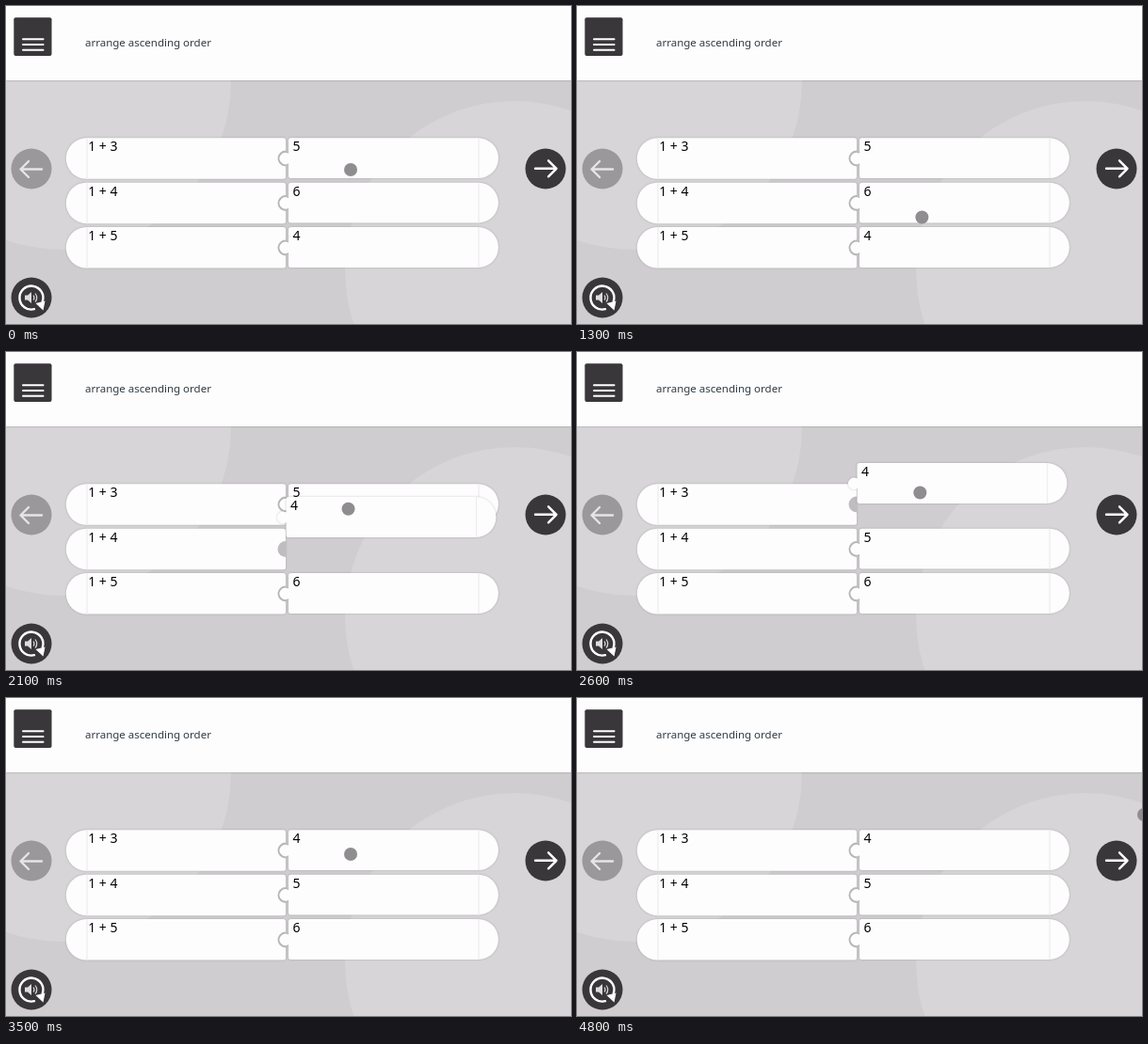
An HTML page that plays this animation: 600x338 px, repeating every 5 s.

```html
<!DOCTYPE html>
<html lang="en">
<head>
<meta charset="utf-8">
<title>Arrange ascending order</title>
<style>
  html, body { margin: 0; width: 100%; height: 100%; overflow: hidden; }
  svg { display: block; width: 600px; height: 338px; background: #cfcdcf; }
  text { font: 14px "Noto Sans", sans-serif; fill: #000; }
  .title { font-size: 11.5px; fill: #2f3b42; }
  .card { fill: #fefdfe; filter: drop-shadow(0 .8px 1px rgba(0, 0, 0, .2)); }
  .header { fill: #fefdfe; filter: drop-shadow(0 .8px 1.2px rgba(0, 0, 0, .3)); }
  .notch { fill: #bfbdbf; }
  .fold { stroke: #f0eef0; stroke-width: 1.5; }
  .dark { fill: #393739; }
  .line { fill: none; stroke: #fff; stroke-width: 2; stroke-linecap: round; stroke-linejoin: round; }
  .bold { stroke-width: 2.4; }
</style>
</head>
<body>
<svg viewBox="0 0 600 338">
  <defs>
    <g id="left">
      <path class="card" d="M85.5 0H294.5Q297 0 297 2.5V41Q297 43.5 294.5 43.5H85.5A21.75 21.75 0 0 1 85.5 0Z"/>
      <path class="notch" d="M297 13.3A8.5 8.5 0 1 0 297 30.3Z"/>
      <path class="fold" d="M86 0V43.5"/>
    </g>
    <g id="right">
      <path class="card" d="M302.5 0H501.5A21.4 21.4 0 0 1 501.5 42.8H302.5Q300 42.8 300 40.3V27A6.2 6.2 0 1 1 300 16.5V2.5Q300 0 302.5 0Z"/>
      <path class="fold" d="M502 0V42.8"/>
    </g>
    <path id="arrow" class="line bold" d="M-11 0H11.5M3 -8.5L11.5 0L3 8.5"/>
  </defs>

  <g fill="#d7d5d7">
    <circle cx="60" cy="80" r="179"/>
    <circle cx="540" cy="281" r="180"/>
  </g>
  <rect class="header" width="600" height="79"/>
  <text class="title" x="84" y="43">arrange ascending order</text>

  <rect class="dark" x="8.3" y="12.2" width="40.2" height="40.8" rx="2"/>
  <path class="line" d="M18 35.2h21.5m-21.5 5.8h21.5m-21.5 5.8h21.5"/>

  <circle cx="27" cy="173" r="21.5" fill="#9a989a"/>
  <use href="#arrow" transform="translate(27 173.5) scale(-1 1)" opacity=".75"/>
  <circle class="dark" cx="573" cy="173" r="21.5"/>
  <use href="#arrow" transform="translate(573 172.8)"/>

  <g transform="translate(27 310)">
    <circle class="dark" r="21.5"/>
    <path class="line bold" d="M3 12.2A12.5 12.5 0 1 1 11.8 4"/>
    <path d="M4.5 6L14.5 3.5L12.5 13.5Z" fill="#fff"/>
    <path d="M-7 -2.5H-4L0 -6V6L-4 2.5H-7Z" fill="#ddd"/>
    <path d="M2 -2.5Q4 0 2 2.5M4 -4.5Q7.5 0 4 4.5" fill="none" stroke="#ddd" stroke-width="1.2"/>
  </g>

  <g id="cards"></g>
  <circle id="pointer" r="7" fill="#8f8d8f"/>
</svg>
<script>
const LOOP = 5000, STEP = 100;
const rowTop = row => 140.3 + 47.4 * row;
const easeOut = k => 1 - (1 - k) ** 1.3;

// Pointer stops: time, x, y
const stops = [
  [0, 366, 174], [600, 367, 155], [700, 367, 163], [1000, 367, 163],
  [1550, 366, 259], [1600, 366, 259], [2000, 363.5, 178], [2400, 363.5, 142],
  [2500, 363.5, 142], [2900, 366, 166], [3700, 366, 166], [4200, 602, 124]
];

// A held card trails the pointer by one step
const drags = [{ value: 5, from: 700, to: 900 }, { value: 4, from: 1700, to: 3500 }];

const layer = document.getElementById("cards");
const pointer = document.getElementById("pointer");

function addCard(shape, label, x) {
  const g = document.createElementNS("http://www.w3.org/2000/svg", "g");
  g.innerHTML = `<use href="#${shape}"/><text x="${x}" y="13.9">${label}</text>`;
  return layer.appendChild(g);
}

const place = (el, x, y) => el.setAttribute("transform", `translate(${x} ${y})`);

const cards = {};
for (let row = 0; row < 3; row++) {
  place(addCard("left", `1 + ${row + 3}`, 87.2), 0, rowTop(row));
}
for (const value of [4, 5, 6]) cards[value] = addCard("right", value, 304.4);

function pointerAt(t) {
  const next = stops.findIndex(stop => stop[0] > t);
  if (next < 0) return stops.at(-1).slice(1);
  const [t0, x0, y0] = stops[next - 1], [t1, x1, y1] = stops[next];
  const k = easeOut((t - t0) / (t1 - t0));
  return [x0 + (x1 - x0) * k, y0 + (y1 - y0) * k];
}

function orderAt(t) {
  if (t < 2000) return [5, 6, 4];
  return t < 2300 ? [5, 4, 6] : [4, 5, 6];
}

function draw(t) {
  place(pointer, ...pointerAt(t));
  orderAt(t).forEach((value, row) => place(cards[value], 0, rowTop(row)));
  const drag = drags.find(d => t >= d.from && t < d.to);
  if (!drag) return;
  const [grabX, grabY] = pointerAt(drag.from - STEP);
  const [x, y] = pointerAt(t - STEP);
  const startRow = orderAt(drag.from).indexOf(drag.value);
  const card = cards[drag.value];
  if (layer.lastChild !== card) layer.append(card);
  place(card, x - grabX, y - grabY + rowTop(startRow));
}

const start = performance.now();
function tick() {
  const t = (performance.now() - start) % LOOP;
  draw(Math.floor(t / STEP) * STEP);
  requestAnimationFrame(tick);
}
tick();
</script>
</body>
</html>
```
